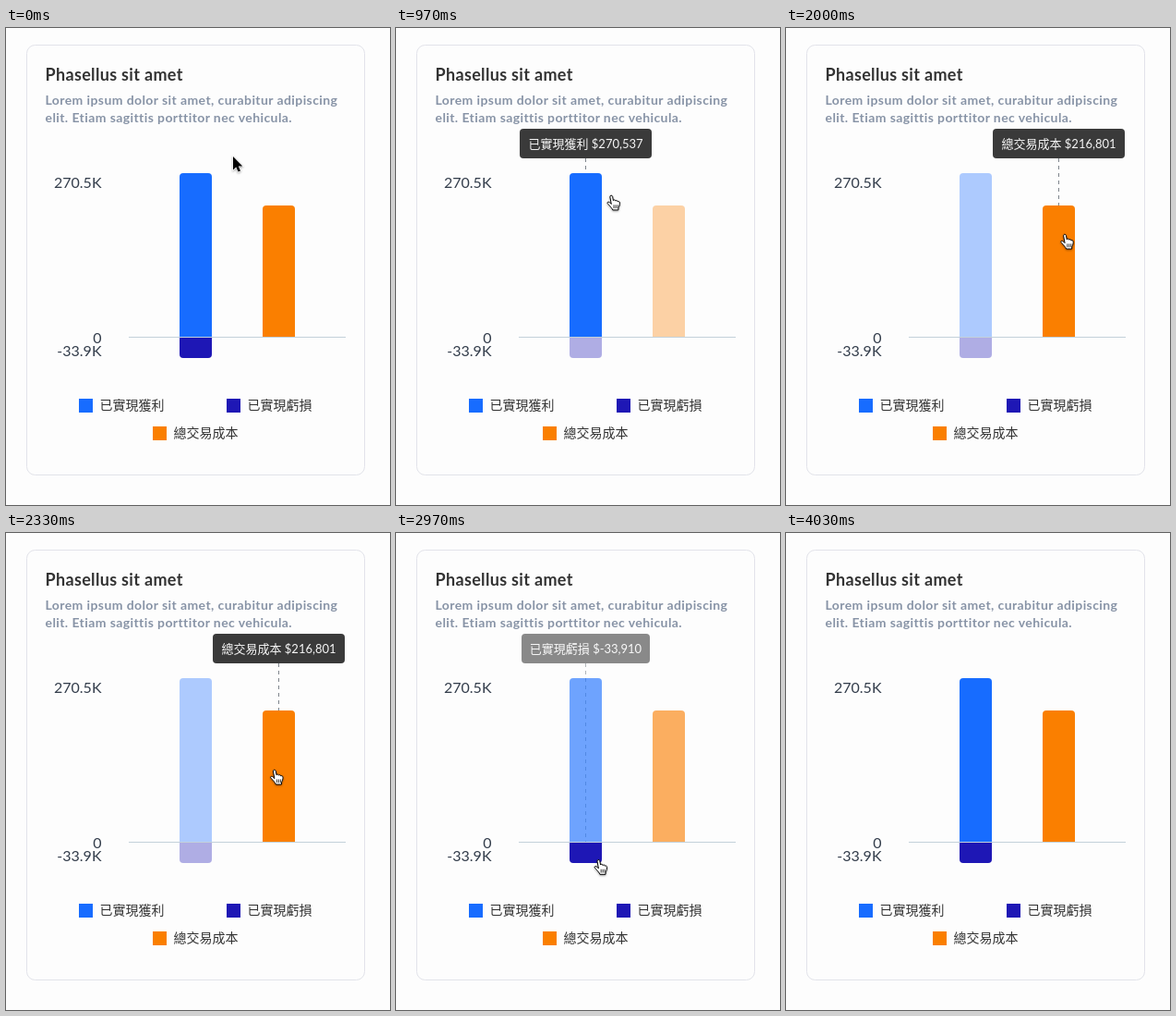
Recreate the animation shown at these times as an HTML page. Size 416 px wide and 516 px high, loop 4.83 s.

```html
<!DOCTYPE html>
<html lang="zh-Hant">
<head>
<meta charset="utf-8">
<title>Profit chart</title>
<style>
  html, body { margin: 0; width: 100%; height: 100%; overflow: hidden; background: #fdfdfd; }
  svg { display: block; width: 416px; height: 516px; }
  text { font-family: Lato, "Noto Sans CJK TC", "Noto Sans CJK", sans-serif; }
  .title { font-size: 18px; font-weight: 700; letter-spacing: .33px; fill: #333; }
  .intro { font-size: 14px; font-weight: 700; letter-spacing: .41px; fill: #8793a6; }
  .axis { font-size: 16px; text-anchor: end; fill: #333d4b; }
  .legend { font-size: 14px; fill: #333; }
  .tip { font-size: 13px; text-anchor: middle; fill: #f6f6f6; }
  .cursor { filter: drop-shadow(0 1px 1px rgba(0, 0, 0, .35)); }
</style>
</head>
<body>
<svg viewBox="0 0 416 516">
  <rect x="22.5" y="18.5" width="366" height="465" rx="9" fill="#fdfdfd" stroke="#e2e3ea"/>
  <text class="title" x="42.5" y="57">Phasellus sit amet</text>
  <text class="intro" x="42.5" y="83">Lorem ipsum dolor sit amet, curabitur adipiscing</text>
  <text class="intro" x="42.5" y="102">elit. Etiam sagittis porttitor nec vehicula.</text>
  <text class="axis" x="103.5" y="173">270.5K</text>
  <text class="axis" x="103.5" y="341">0</text>
  <text class="axis" x="103.5" y="355">-33.9K</text>
  <g id="pointers"></g>
  <rect x="133" y="334" width="235" height="1" fill="#c3d1da"/>
  <g id="bars"></g>
  <g id="legend"></g>
  <g id="tips"></g>
  <g id="arrow" class="cursor">
    <path d="M0 0V14.6L3.3 11.5L5.5 16.6L8 15.5L5.8 10.5H10.3Z" fill="#000" stroke="#fff" stroke-width="1.2" paint-order="stroke"/>
  </g>
  <g id="hand" class="cursor">
    <g transform="translate(-5 -.5)" stroke="#000" stroke-linejoin="round" stroke-linecap="round">
      <path fill="#fff" d="M3.6 2C3.3 .4 6 .1 6.4 1.8L7.2 6.2C7.4 5.2 9.4 5.2 9.7 6.7C10 5.8 11.8 6 12 7.4C12.6 6.8 14.2 7.2 14.2 8.6C14.3 11 13.6 12.6 12.8 14L12.6 16.5H6.6C6 14.8 4.6 13.4 3.2 11.8C2 10.4 .9 9.4 .8 8.8C.7 7.6 2.4 7.4 3.4 8.4L4.8 9.8Z"/>
      <path fill="none" stroke-width=".8" d="M7.8 11.3v3M9.8 11.3v3M11.8 11.3v3"/>
    </g>
  </g>
</svg>
<script>
const LOOP = 4830, FADE = 200, DIM = .35, CURSOR_GONE = 3670;

// on/off: when the pointer enters and leaves the bar
const series = [
  { name: '已實現獲利', value: '$270,537', color: '#176cff', mid: 205.5, tipW: 143, legend: [79, 401], on: 330, off: 985,
    shape: 'M188 334V161a4 4 0 0 1 4-4h27a4 4 0 0 1 4 4V334Z' },
  { name: '已實現虧損', value: '$-33,910', color: '#1e17b5', mid: 205.5, tipW: 139, legend: [239, 401], on: 2920, off: 3505,
    shape: 'M188 335V353a4 4 0 0 0 4 4h27a4 4 0 0 0 4-4V335Z' },
  { name: '總交易成本', value: '$216,801', color: '#fa7f00', mid: 295.5, tipW: 143, legend: [159, 431], on: 1760, off: 2430,
    shape: 'M278 334V196a4 4 0 0 1 4-4h27a4 4 0 0 1 4 4V334Z' },
];

// time, x, y of the pointer's hot spot
const path = [
  [0, 246, 139], [30, 246, 139], [200, 240, 150], [330, 222, 170], [530, 208, 190], [700, 206, 198],
  [880, 214, 192], [970, 233, 181], [1150, 268, 172], [1330, 312, 178], [1530, 336, 201], [1620, 333, 209],
  [1760, 313, 216], [1900, 304, 222], [2000, 302, 223], [2170, 302, 223], [2300, 294, 247], [2430, 278, 292],
  [2730, 251, 377], [2800, 243, 378], [2920, 223, 356], [3130, 213, 349], [3300, 213, 349], [3500, 213, 356],
  [3590, 290, 370], [3670, 400, 376],
];

const byId = id => document.getElementById(id);

function add(parent, tag, attrs, text = '') {
  const el = document.createElementNS('http://www.w3.org/2000/svg', tag);
  for (const key in attrs) el.setAttribute(key, attrs[key]);
  el.textContent = text;
  return parent.appendChild(el);
}

for (const s of series) {
  const [lx, ly] = s.legend;
  s.line = add(byId('pointers'), 'path', {
    d: `M${s.mid} 141V334`, stroke: '#7f858c', 'stroke-dasharray': '4 4',
  });
  s.bar = add(byId('bars'), 'path', { d: s.shape, fill: s.color });
  add(byId('legend'), 'rect', { x: lx, y: ly, width: 15, height: 15, fill: s.color });
  add(byId('legend'), 'text', { class: 'legend', x: lx + 22.5, y: ly + 12 }, s.name);
  s.tip = add(byId('tips'), 'g', {});
  add(s.tip, 'rect', { x: s.mid - s.tipW / 2, y: 109, width: s.tipW, height: 32, rx: 4, fill: '#3a3a3a' });
  add(s.tip, 'text', { class: 'tip', x: s.mid, y: 129.5 }, `${s.name} ${s.value}`);
}

const ease = p => 1 - (1 - Math.min(1, Math.max(0, p))) ** 3;
const level = (s, t) => ease((t - s.on) / FADE) * (1 - ease((t - s.off) / FADE));

const slope = (i, k) => (path[i + 1][k] - path[i][k]) / (path[i + 1][0] - path[i][0]);

function tangent(i, k) {
  if (i === 0 || i === path.length - 1) return slope(Math.max(0, i - 1), k);
  const a = slope(i - 1, k), b = slope(i, k);
  return a * b > 0 ? 2 * a * b / (a + b) : 0;
}

// Smooth curve through the points that holds still between equal ones
function along(t, k) {
  let i = 0;
  while (i < path.length - 2 && path[i + 1][0] <= t) i++;
  const d = path[i + 1][0] - path[i][0], u = (t - path[i][0]) / d, v = 1 - u;
  return path[i][k] * v * v * (1 + 2 * u) + tangent(i, k) * d * u * v * v
    + path[i + 1][k] * u * u * (1 + 2 * v) - tangent(i + 1, k) * d * u * u * v;
}

function draw(now) {
  const t = now % LOOP;
  for (const s of series) {
    const own = level(s, t);
    const others = Math.max(...series.filter(o => o !== s).map(o => level(o, t)));
    s.bar.setAttribute('opacity', 1 - (1 - DIM) * others);
    s.line.setAttribute('opacity', own);
    s.tip.setAttribute('opacity', own);
  }

  const visible = t < CURSOR_GONE;
  const hovering = series.some(s => t >= s.on && t < s.off);
  const x = visible ? along(t, 1) : 0, y = visible ? along(t, 2) : 0;
  for (const [id, shown] of [['arrow', !hovering], ['hand', hovering]]) {
    byId(id).setAttribute('transform', `translate(${x} ${y})`);
    byId(id).setAttribute('visibility', visible && shown ? 'visible' : 'hidden');
  }
}

const start = performance.now();
function tick() {
  draw(performance.now() - start);
  requestAnimationFrame(tick);
}
tick();
</script>
</body>
</html>
```
